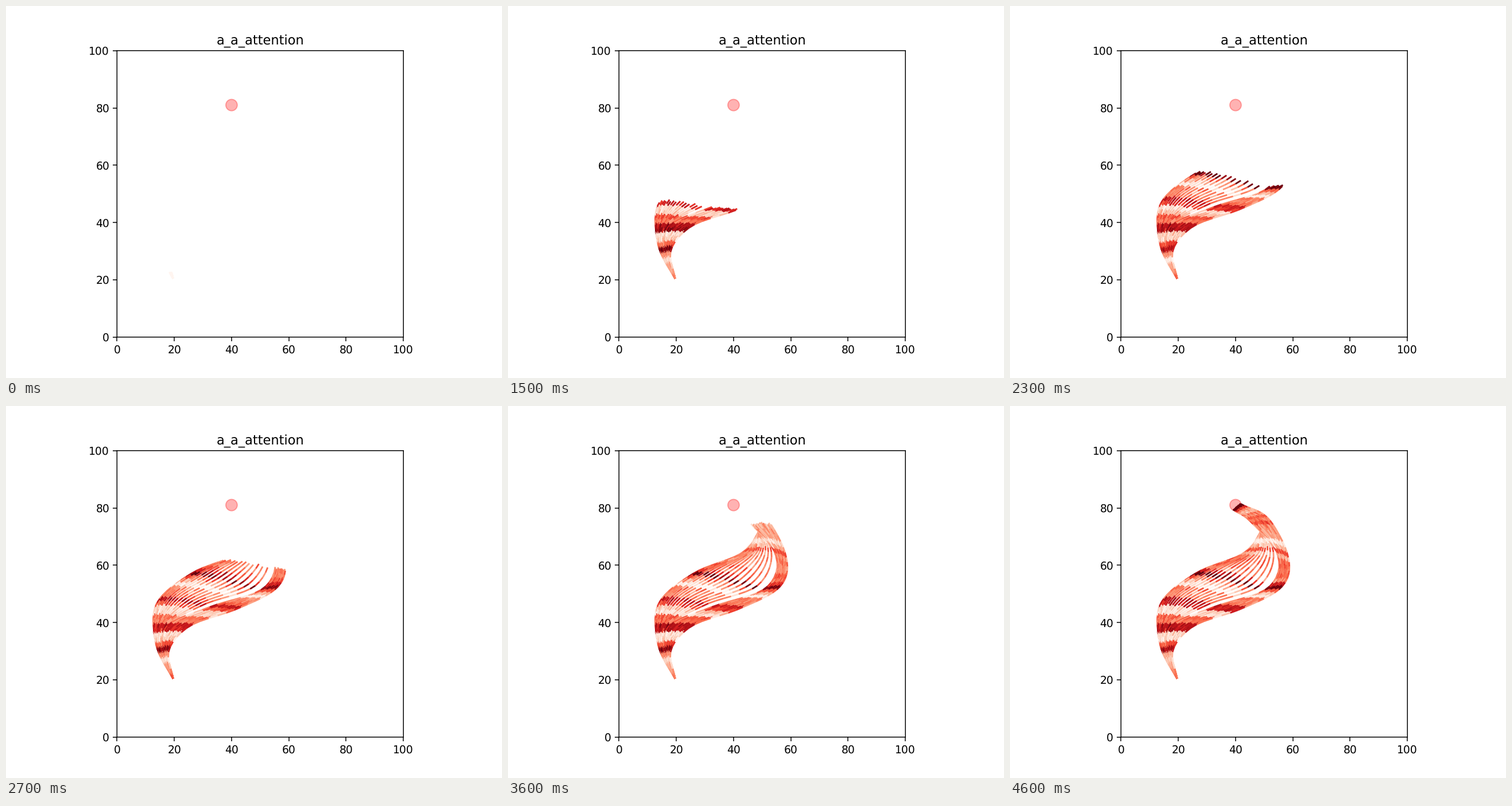
A matplotlib script that plays this animation: 864 by 648 pixels, repeating every 4.9 s.

```python
import numpy as np
import matplotlib.pyplot as plt
from matplotlib.animation import FuncAnimation
from matplotlib.collections import LineCollection

STEPS = 47      # drawn segments per path
HOLD = 2        # extra ticks on the finished picture
N_LEFT, N_RIGHT = 18, 18
START, GOAL = (19.6, 20.4), (40, 81)

# where the outer, inner and right guides pass at a few steps
GUIDES = {
    0: (START, START, START),
    5: ((14.5, 29.6), (16.4, 30.0), (18.1, 30.2)),
    10: ((12.8, 38.0), (17.2, 38.5), (24.8, 38.4)),
    16: ((14.0, 46.8), (29.5, 45.9), (41.5, 44.6)),
    24: ((26.0, 57.0), (48.7, 53.2), (56.6, 53.0)),
    32: ((44.5, 65.5), (52.7, 66.7), (57.8, 64.9)),
    37: ((50.0, 74.8), (46.3, 74.2), (52.8, 74.6)),
    47: ((41.2, 81.0), (39.1, 79.5), (41.5, 81.6)),
}

PEAKS = (5.2, 9.4, 15.7, 23, 45.8)      # steps with strong attention
DIPS = (3.6, 7.5, 13.8, 20.5, 33.5)     # steps with little


def smooth(s, keys, pts):
    """Cubic Hermite curve through pts at the given keys."""
    slope = np.gradient(pts, keys, axis=0)
    i = np.clip(np.searchsorted(keys, s, side="right") - 1, 0, len(keys) - 2)
    h = (keys[i + 1] - keys[i])[:, None, None]
    t = (s - keys[i])[:, None, None] / h
    return ((1 + 2 * t) * (1 - t) ** 2 * pts[i] + t * (1 - t) ** 2 * h * slope[i]
            + t * t * (3 - 2 * t) * pts[i + 1] + t * t * (t - 1) * h * slope[i + 1])


def make_path(u, on_left, lag):
    s = np.clip(np.arange(STEPS + 1) - lag, 0, STEPS)
    curve = smooth(s, np.array(list(GUIDES), float), np.array(list(GUIDES.values())))
    outer, inner, right = curve.transpose(1, 0, 2)
    spread = np.exp(-((s - 22) / 9) ** 4)[:, None]
    if on_left:
        bulge = spread * [0, 1.4 * np.sin(np.pi * u)]
        return outer + (inner - outer) * u ** 1.7 + bulge
    first = inner + spread * [3, -.8]
    return first + (right - first) * u


def bumps(steps, centres, width):
    return sum(np.exp(-((steps - c) / width) ** 2) for c in centres)


rng = np.random.default_rng(4)
paths = np.array([make_path(u, side, rng.uniform(-.3, .3))
                  for side, n in ((True, N_LEFT), (False, N_RIGHT))
                  for u in np.linspace(0, 1, n)])
segments = np.stack([paths[:, :-1], paths[:, 1:]], axis=2)

step = np.arange(STEPS)
weight = (.42 + rng.normal(0, .09, STEPS) + .55 * bumps(step, PEAKS, 1)
          - .3 * bumps(step, DIPS, 1.3))
grain = rng.normal(0, .07, segments.shape[:2])
reds = plt.get_cmap("Reds")


def shades(k):
    if k == 0:
        return np.zeros((len(paths), 1))
    flicker = np.random.default_rng(k).normal(0, .05, STEPS)
    return np.clip(weight + flicker + grain, 0, 1)[:, :k + 1]


plt.rcParams["text.hinting"] = "none"
fig, ax = plt.subplots(figsize=(6.4, 4.8), dpi=135)
ax.set(xlim=(0, 100), ylim=(0, 100), aspect="equal", title="a_a_attention")
ax.add_patch(plt.Circle(GOAL, 2, color="r", alpha=.3))
trails = ax.add_collection(LineCollection([], linewidths=1.5), autolim=False)
for spine in ax.spines.values():
    spine.set_snap(False)


def draw(i):
    k = min(i, STEPS - 1)
    trails.set_segments(segments[:, :k + 1].reshape(-1, 2, 2))
    trails.set_color(reds(shades(k).ravel()))
    return [trails]


anim = FuncAnimation(fig, draw, frames=STEPS + HOLD, interval=100, repeat=True)
plt.show()
```
